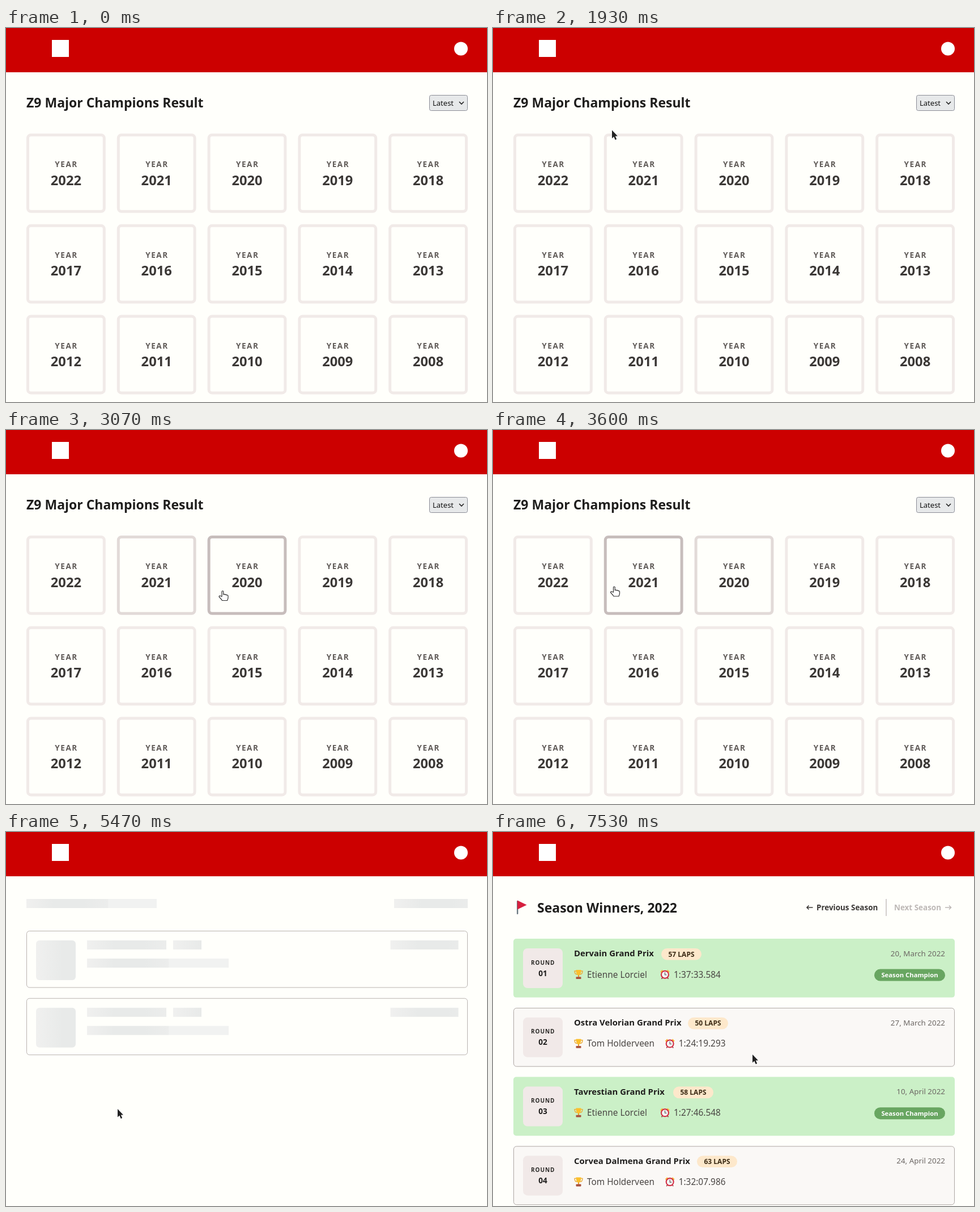
Animation, 849 px wide and 659 px high, one loop 8000 ms. Source, as an HTML page:

```html
<!DOCTYPE html>
<html lang="en">
<head>
<meta charset="utf-8">
<style>
html, body { margin: 0; width: 100%; height: 100%; overflow: hidden; background: #fffffb; }
svg { display: block; width: 849px; height: 659px; font-family: "Noto Sans", "Open Sans", sans-serif; }
.b { font-weight: 700; }
.m { text-anchor: middle; }
.e { text-anchor: end; }
</style>
</head>
<body>
<svg id="stage" viewBox="0 0 849 659" xmlns="http://www.w3.org/2000/svg"></svg>
<script>
const LOOP = 8000, FPS = 15;
const COLS = 5, ROWS = 3, STEP = 159.8, SIZE = 139.8, LEFT = 36, TOP = 186;
const SKELETON_AT = 69, LIST_AT = 96;
const IDLE = [241, 234, 232], HOVER = [184, 173, 172];

// Pointer path: [tick, x, y]
const PATH = [
  [6, 834, 189], [8, 834, 189], [9, 752, 160], [10, 666, 128], [13, 666, 128],
  [14, 710, 138], [16, 800, 158], [18, 834, 163], [19, 834, 163], [20, 830, 163],
  [22, 830, 163], [23, 760, 164], [24, 620, 162], [26, 353, 157], [27, 300, 165],
  [29, 210, 180], [30, 172, 196], [33, 140, 270], [35, 140, 270], [37, 170, 274],
  [38, 204, 275], [43, 325, 281], [44, 360, 283], [48, 405, 284], [51, 358, 282],
  [52, 310, 279], [54, 214, 276], [56, 172, 277], [60, 151, 278], [77, 151, 278],
  [78, 160, 295], [80, 198, 385], [81, 205, 448], [82, 197, 488], [99, 197, 488],
  [100, 234, 488], [103, 234, 488], [104, 436, 415], [106, 436, 415],
  [107, 448, 402], [108, 457, 392], [112, 457, 392], [113, 458, 392]
];

const RACES = [
  { name: "Dervain Grand Prix", laps: 57, pill: 297, who: "Etienne Lorciel", time: "1:37:33.584", date: "20, March 2022", champ: true },
  { name: "Ostra Velorian Grand Prix", laps: 50, pill: 344, who: "Tom Holderveen", time: "1:24:19.293", date: "27, March 2022" },
  { name: "Tavrestian Grand Prix", laps: 58, pill: 318, who: "Etienne Lorciel", time: "1:27:46.548", date: "10, April 2022", champ: true },
  { name: "Corvea Dalmena Grand Prix", laps: 63, pill: 360, who: "Tom Holderveen", time: "1:32:07.986", date: "24, April 2022" }
];

const rect = (x, y, w, h, r, fill, more = "") =>
  `<rect x="${x}" y="${y}" width="${w}" height="${h}" rx="${r}" fill="${fill}" ${more}/>`;
const text = (x, y, size, fill, str, cls = "", more = "") =>
  `<text x="${x}" y="${y}" font-size="${size}" fill="${fill}" class="${cls}" ${more}>${str}</text>`;
const line = (d, stroke, width) =>
  `<path d="${d}" fill="none" stroke="${stroke}" stroke-width="${width}"/>`;
const group = (id, body) => `<g id="${id}">${body}</g>`;
const at = (x, y, body) => `<g transform="translate(${x} ${y})">${body}</g>`;

function header() {
  return rect(0, 0, 849, 78, 0, "#cc0000") +
    rect(81, 21, 30, 30, 0, "#fff") +
    `<circle cx="803" cy="36.5" r="12" fill="#fff"/>`;
}

function yearCard(i) {
  const x = LEFT + (i % COLS) * STEP, y = TOP + Math.floor(i / COLS) * STEP;
  return at(x, y,
    rect(2.5, 2.5, SIZE - 5, SIZE - 5, 5.5, "none", 'class="card" stroke-width="5"') +
    text(70.6, 59, 13.6, "#605b58", "YEAR", "b m", 'letter-spacing="1.5"') +
    text(SIZE / 2, 90.6, 23.7, "#3b3836", 2022 - i, "b m"));
}

function yearsPage() {
  let s = text(36, 140.3, 23, "#1f1e1d", "Z9 Major Champions Result", "b") +
    rect(747.5, 118.5, 67, 27, 3, "#e7e9ea", 'stroke="#8b8d96"') +
    text(753, 136.8, 13, "#111", "Latest") +
    line("M800 130l4 4 4-4", "#222", 1.6);
  for (let i = 0; i < COLS * ROWS; i++) s += yearCard(i);
  return s;
}

const bone = (x, y, w, h = 16, r = 0) => at(x, y, rect(0, 0, w, h, r, "url(#shade)"));

function skeletonPage() {
  const card = y => at(0, y,
    rect(36.5, .5, 778, 99.5, 5, "none", 'stroke="#b9b3b0"') +
    bone(53, 17, 70, 70, 6) + bone(143, 17, 140) + bone(295, 17, 50) +
    bone(143, 49, 250) + bone(678.5, 17, 120));
  return bone(36, 118, 230) + bone(685, 118, 130) + card(174) + card(292.7);
}

const trophy = (x, y) => at(x, y,
  line("M4 2H1C1 6 3 8 6 8M12 2h3c0 4-2 6-5 6", "#e8ab3a", 1.4) +
  `<path d="M3.5 0h9C12.500 6 11 9 8 9.500 5 9 3.500 6 3.500 0z" fill="#fbc02d"/>` +
  rect(7, 9, 2, 4, 0, "#e39a2c") + rect(3.5, 12.2, 9, 3.8, .8, "#a9513c"));

const clock = (x, y) => at(x, y,
  line("M-7.500-4l3.500-3.500M7.500-4L4-7.500", "#f6b93b", 2.6) +
  line("M-4.500 5.500l-1.500 2M4.500 5.500l1.500 2", "#8d3038", 1.5) +
  `<circle r="6.500" fill="#f3f5f5" stroke="#d3283f" stroke-width="2"/>` +
  line("M0-4V.5H3", "#555", 1.1));

function raceCard(r, i) {
  const shift = r.who.startsWith("Tom") ? 8.7 : 0;
  let s = r.champ
    ? rect(36, 0, 779, 103.6, 5, "#cbf0c7")
    : rect(36.5, .5, 778, 102.8, 5, "#faf8f6", 'stroke="#aea7a4"');
  s += rect(53, 17, 70, 70, 8, "#f1e9e8") +
    text(88.2, 45.6, 10, "#2b2927", "ROUND", "b m", 'letter-spacing="0.900"') +
    text(88, 65.6, 13.6, "#1f1e1d", "0" + (i + 1), "b m") +
    text(143, 31.4, 14.9, "#1f1e1d", r.name, "b") +
    rect(r.pill, 17, 71, 20.6, 10.3, "#fde8cb") +
    text(r.pill + 35.5, 31.6, 12, "#3a2a14", r.laps + " LAPS", "b m") +
    trophy(143, 55) +
    text(166, 68.5, 15.4, "#4a4644", r.who) +
    clock(303.5 + shift, 63.2) +
    text(319 + shift, 68.5, 15.4, "#4a4644", r.time) +
    text(798, 30.8, 13.4, "#6c6764", r.date, "e");
  if (r.champ) {
    s += rect(673, 53.6, 125, 21, 10.5, "#68a661") +
      text(735.5, 68.3, 11.3, "#fff", "Season Champion", "b m");
  }
  return at(0, 188 + i * 121.8, s);
}

function listPage() {
  return rect(42, 121, 2.4, 24, 1, "#6c7a83") +
    `<path d="M43 120.500L59.500 128.500 43 136.500z" fill="#d6203f"/>` +
    text(78, 141.5, 23, "#1f1e1d", "Season Winners, 2022", "b") +
    line("M564.500 133H554M557.500 129.500L554 133l3.500 3.500", "#3b3836", 1.6) +
    text(571, 138, 13.45, "#3b3836", "Previous Season", "b") +
    line("M694 118v30", "#d3cecc", 2) +
    text(708, 138, 13.45, "#bdb8b6", "Next Season", "b") +
    line("M798 133h10.500M805 129.500l3.500 3.500-3.500 3.500", "#bdb8b6", 1.6) +
    RACES.map(raceCard).join("");
}

const beam = "M-2-9.500C0-9.500 1-9 1-8 1-9 2-9.500 4-9.500M1-8V5M-2 6.500C0 6.500 1 6 1 5 1 6 2 6.500 4 6.500";
const pointers =
  group("arrow", `<path d="M0 0V14.500L3.300 11.400 5.700 17 8.200 16 5.800 10.500H10z" fill="#222" stroke="#fff" stroke-width="1.200" stroke-linejoin="round" paint-order="stroke"/>`) +
  group("hand", `<path d="M-1.500 10V1.500C-1.500-.500 1.300-.500 1.300 1.500V6.500C2 5.400 4 5.600 4.200 7 5 6 6.700 6.300 7 7.700 8 7 9.500 7.600 9.500 9V12C9.500 14 8.500 15 8 17H-1C-2-.500-2 14-4.500 12.500L-6.300 10.500C-7 9-5 8-3.700 9z" fill="#fff" stroke="#333" stroke-width="1.200" stroke-linejoin="round"/>`.replace("-2-.500-2 14", "-2 15-3 14")) +
  group("beam", line(beam, "#fff", 3) + line(beam, "#222", 1.2));

const stage = document.getElementById("stage");
stage.innerHTML = `<defs><linearGradient id="shade" gradientUnits="userSpaceOnUse" x1="0" y1="0" x2="145" y2="0">
  <stop offset="0" stop-color="#f0f0ef"/><stop offset=".33" stop-color="#e8eae9"/>
  <stop offset=".7" stop-color="#e8eae9"/><stop offset=".99" stop-color="#ecedec"/>
  <stop offset="1" stop-color="#f1f2f1"/></linearGradient></defs>` +
  rect(0, 0, 849, 659, 0, "#fffffb") + header() +
  group("years", yearsPage()) + group("skeleton", skeletonPage()) +
  group("list", listPage()) + group("pointer", pointers);

const el = id => document.getElementById(id);
const show = (id, on) => el(id).setAttribute("display", on ? "inline" : "none");
const cards = [...stage.querySelectorAll(".card")];

function pointerAt(tick) {
  if (tick < PATH[0][0]) return null;
  const n = PATH.findIndex(p => p[0] > tick);
  if (n < 0) return PATH[PATH.length - 1].slice(1);
  const [t0, x0, y0] = PATH[n - 1], [t1, x1, y1] = PATH[n];
  const k = (tick - t0) / (t1 - t0);
  return [x0 + (x1 - x0) * k, y0 + (y1 - y0) * k];
}

function cardAt(tick) {
  const p = pointerAt(tick);
  if (!p || tick >= SKELETON_AT) return -1;
  const x = p[0] - LEFT, y = p[1] - TOP;
  const c = Math.floor(x / STEP), r = Math.floor(y / STEP);
  const inside = x >= 0 && y >= 0 && c < COLS && r < ROWS &&
    x - c * STEP <= SIZE && y - r * STEP <= SIZE;
  return inside ? r * COLS + c : -1;
}

// Border fade takes three ticks each way
function hoverLevel(card, tick) {
  let v = 0;
  for (let k = 0; k < tick; k++) {
    v = Math.min(1, Math.max(0, v + (cardAt(k) === card ? 1 : -1) / 3));
  }
  return v * v * (3 - 2 * v);
}

function draw(ms) {
  const tick = Math.floor(ms * FPS / 1000 + 0.08);
  const page = tick < SKELETON_AT ? "years" : tick < LIST_AT ? "skeleton" : "list";
  for (const id of ["years", "skeleton", "list"]) show(id, id === page);

  if (page === "years") {
    cards.forEach((c, i) => {
      const v = hoverLevel(i, tick);
      c.setAttribute("stroke", `rgb(${IDLE.map((a, n) => Math.round(a + (HOVER[n] - a) * v))})`);
    });
  }

  const p = pointerAt(tick);
  show("pointer", p);
  if (!p) return;
  el("pointer").setAttribute("transform", `translate(${p[0]} ${p[1]})`);
  const overText = page === "list" && tick < 104;
  const kind = overText ? "beam" : cardAt(tick) >= 0 ? "hand" : "arrow";
  for (const id of ["arrow", "hand", "beam"]) show(id, id === kind);
}

let last = -1;
const start = performance.now();
function loop() {
  const ms = (performance.now() - start) % LOOP;
  const tick = Math.floor(ms * FPS / 1000 + 0.08);
  if (tick !== last) draw(ms);
  last = tick;
  requestAnimationFrame(loop);
}
loop();
</script>
</body>
</html>
```
